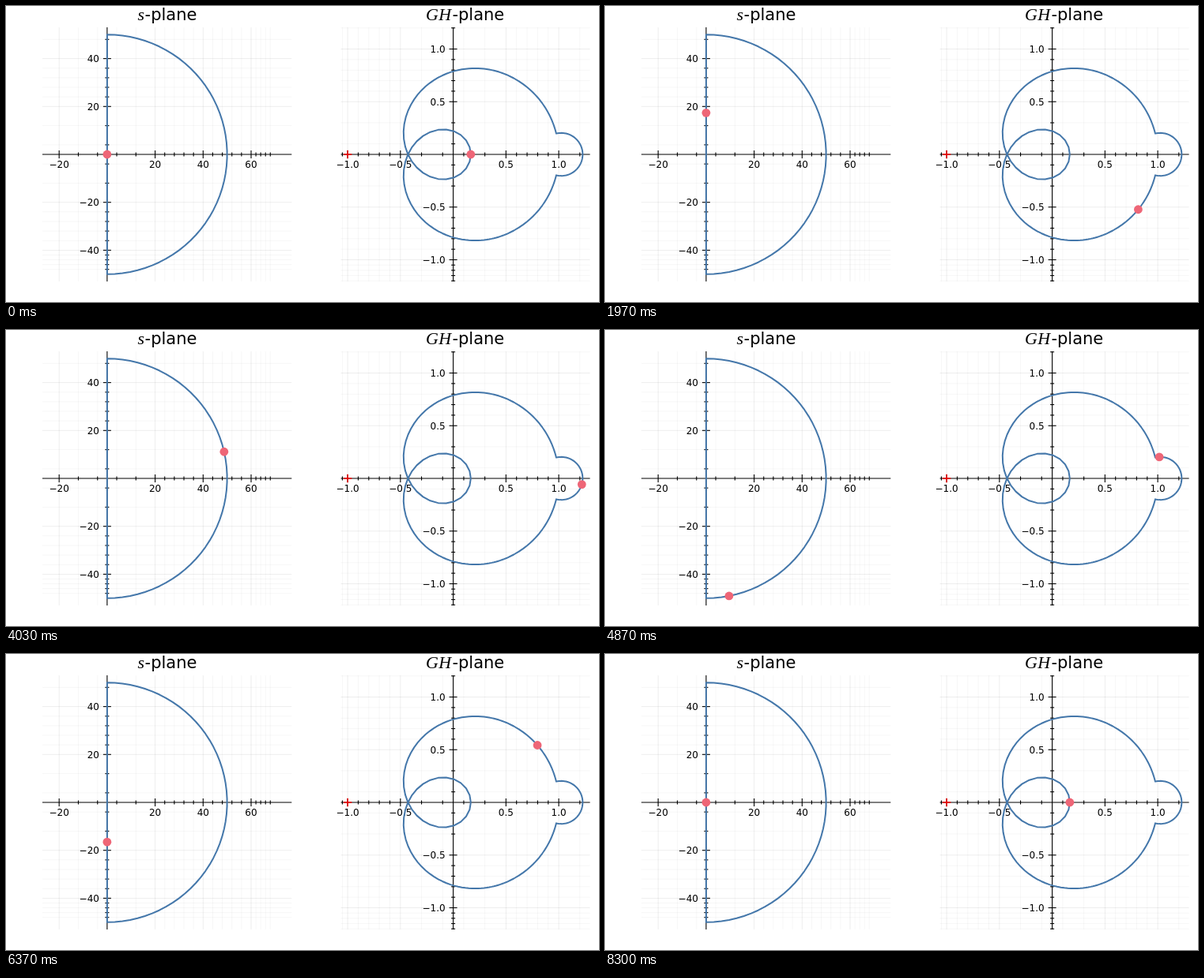
An HTML page with a canvas that plays this animation: 750x375 px, repeating every 8330 ms.

```html
<!DOCTYPE html>
<html lang="en">
<head>
<meta charset="utf-8">
<title>Nyquist contour</title>
<style>
html, body { margin: 0; width: 100%; height: 100%; overflow: hidden; background: #fff; }
canvas { display: block; }
</style>
</head>
<body>
<canvas id="stage" width="750" height="375"></canvas>
<script>
const ctx = document.getElementById("stage").getContext("2d");
const LOOP = 8330, STEP = 100 / 3;
const TOP = 27.1, BOTTOM = 348.9;
const BLUE = "#4477aa", PINK = "#ee6677";

const planes = [
  { x0: 127.9, y0: 188, scale: 3.035, left: 46, right: 361.3, digits: 0,
    xTicks: [-20, 20, 40, 60], yTicks: [-40, -20, 20, 40],
    symbols: [["s", 166.5]], titleX: 175.6 },
  { x0: 565.6, y0: 188, scale: 133.5, left: 423.6, right: 738.6, digits: 1,
    xTicks: [-1, -0.5, 0.5, 1], yTicks: [-1, -0.5, 0.5, 1],
    symbols: [["G", 531], ["H", 547.3]], titleX: 564.4 }
];

// n evenly spaced values from a to b, both included
const span = (a, b, n) => Array.from({ length: n }, (_, i) => a + (b - a) * i / (n - 1));

// Contour: up the imaginary axis, round the right half-plane, back up to zero
const onAxis = w => [0, w];
const onArc = a => [50 * Math.cos(a), 50 * Math.sin(a)];
const contour = [
  ...span(0, 10, 50).map(onAxis),
  ...span(10, 50, 50).map(onAxis),
  ...span(Math.PI / 2, -Math.PI / 2, 50).map(onArc),
  ...span(-50, -10, 50).map(onAxis),
  ...span(-10, 0, 50).map(onAxis)
];

const mul = ([a, b], [c, d]) => [a * c - b * d, a * d + b * c];
const shift = ([a, b], k) => [a + k, b];

// GH(s) = (s + 1)(s + 2) / ((s - 3)(s - 4))
function transfer(s) {
  const num = mul(shift(s, 1), shift(s, 2));
  const [c, d] = mul(shift(s, -3), shift(s, -4));
  const size = c * c + d * d;
  return mul(num, [c / size, -d / size]);
}
const curves = [contour, contour.map(transfer)];

// Four minor ticks per gap; the outer gaps continue the ratio of the first two
function minorTicks(ticks) {
  const [a, b, c, d] = ticks;
  const ratio = (c - b) / (b - a);
  const all = [a - (b - a) / ratio, ...ticks, d + (d - c) * ratio];
  return all.slice(1).flatMap((hi, i) =>
    [1, 2, 3, 4].map(k => all[i] + (hi - all[i]) * k / 5));
}

function line(x1, y1, x2, y2) {
  ctx.beginPath();
  ctx.moveTo(x1, y1);
  ctx.lineTo(x2, y2);
  ctx.stroke();
}

function pen(color, width) {
  ctx.strokeStyle = color;
  ctx.lineWidth = width;
}

function text(str, x, y, font, align) {
  ctx.font = font;
  ctx.textAlign = align;
  ctx.fillText(str, x, y);
}

function drawAxes(p) {
  const { x0, y0, scale, left, right } = p;
  const xPos = v => x0 + v * scale, yPos = v => y0 - v * scale;
  const inX = v => xPos(v) >= left && xPos(v) <= right;
  const inY = v => yPos(v) >= TOP && yPos(v) <= BOTTOM;
  const levels = [
    { xs: minorTicks(p.xTicks).filter(inX), ys: minorTicks(p.yTicks).filter(inY), grid: 0.05, size: 2.5 },
    { xs: p.xTicks, ys: p.yTicks, grid: 0.1, size: 5 }
  ];

  for (const { xs, ys, grid } of levels) {
    pen(`rgba(0,0,0,${grid})`, 0.7);
    xs.forEach(v => line(xPos(v), TOP, xPos(v), BOTTOM));
    ys.forEach(v => line(left, yPos(v), right, yPos(v)));
  }

  pen("#000", 1.1);
  line(left, y0, right, y0);
  line(x0, TOP, x0, BOTTOM);
  for (const { xs, ys, size } of levels) {
    xs.forEach(v => line(xPos(v), y0 - size, xPos(v), y0 + size));
    ys.forEach(v => line(x0 - size, yPos(v), x0 + size, yPos(v)));
  }

  ctx.fillStyle = "#000";
  const label = v => v.toFixed(p.digits).replace("-", "\u2212");
  const small = "12px 'DejaVu Sans', sans-serif";
  p.xTicks.forEach(v => text(label(v), xPos(v), 205.3, small, "center"));
  p.yTicks.forEach(v => text(label(v), x0 - 10, yPos(v) + 4.4, small, "right"));

  p.symbols.forEach(([ch, x]) =>
    text(ch, x, 18, "italic 22px 'Liberation Serif', serif", "left"));
  text("-plane", p.titleX, 18, "21px 'DejaVu Sans', sans-serif", "left");
}

function drawCurve({ x0, y0, scale }, points) {
  pen(BLUE, 2);
  ctx.lineJoin = "round";
  ctx.beginPath();
  points.forEach(([x, y]) => ctx.lineTo(x0 + x * scale, y0 - y * scale));
  ctx.stroke();
}

function drawDot({ x0, y0, scale }, [x, y]) {
  ctx.fillStyle = PINK;
  ctx.beginPath();
  ctx.arc(x0 + x * scale, y0 - y * scale, 5.4, 0, 2 * Math.PI);
  ctx.fill();
}

function drawCriticalPoint({ x0, y0, scale }) {
  const x = x0 - scale;
  pen("#f00", 1.4);
  line(x - 5.3, y0, x + 5.3, y0);
  line(x, y0 - 5.3, x, y0 + 5.3);
}

function draw() {
  // Steps start on whole hundredths of a second
  const t = Math.floor(performance.now() % LOOP / 10) * 10;
  const index = Math.min(contour.length - 1, Math.floor((t + 3.4) / STEP));
  ctx.fillStyle = "#fff";
  ctx.fillRect(0, 0, 750, 375);
  planes.forEach((p, i) => {
    drawAxes(p);
    drawCurve(p, curves[i]);
    if (i === 1) drawCriticalPoint(p);
    drawDot(p, curves[i][index]);
  });
  requestAnimationFrame(draw);
}
draw();
</script>
</body>
</html>
```
